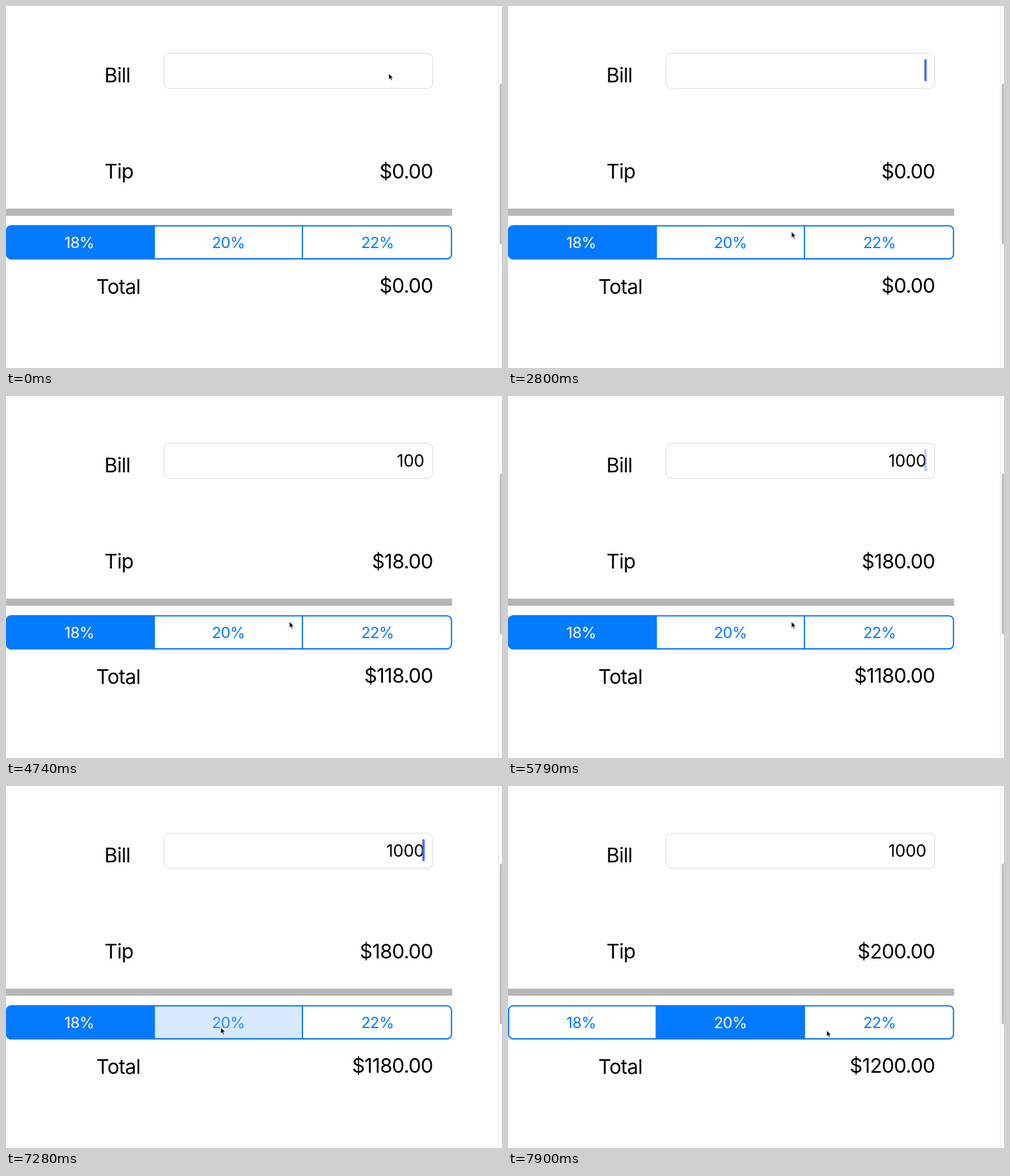
Animation, 875 px wide and 640 px high, one loop 8000 ms. Source, as an HTML page:

```html
<!DOCTYPE html>
<html lang="en">
<head>
<meta charset="utf-8">
<title>Tip calculator</title>
<style>
  html, body { margin: 0; width: 100%; height: 100%; overflow: hidden; background: #fefefe; }
  svg { display: block; width: 875px; height: 640px; }
  text { font-family: Inter, "Open Sans", sans-serif; fill: #000; }
  .label, .money { font-size: 35.4px; letter-spacing: -.75px; }
  .bill { font-size: 29.5px; letter-spacing: -.2px; }
  .money, .bill { text-anchor: end; }
  .rate { font-size: 27px; letter-spacing: -.6px; text-anchor: middle; }
</style>
</head>
<body>
<svg viewBox="0 0 875 640">
  <rect width="875" height="640" fill="#fefefe"/>
  <rect x="868" width="7" height="640" fill="#fafafa"/>
  <rect x="868" width="1" height="640" fill="#e8e8e8"/>
  <rect x="871" y="137" width="8" height="284.5" rx="3.5" fill="#c1c1c1"/>

  <text class="label" x="173.5" y="135">Bill</text>
  <text class="label" x="173.8" y="305.3">Tip</text>
  <text class="label" x="159.3" y="509">Total</text>

  <rect x="278.8" y="83.5" width="474" height="62.4" rx="10" fill="#fefefe" stroke="#d6d6d6"/>
  <text class="bill" id="bill" x="738" y="124.5"></text>
  <rect id="caret" x="734.4" y="94" width="4.2" height="39" rx="1.8" fill="#456ae8"/>

  <text class="money" id="tip" x="753.2" y="304.8"></text>
  <rect y="358.2" width="787" height="12.6" fill="#b6b6b6"/>
  <text class="money" id="total" x="753.2" y="507"></text>

  <clipPath id="round"><rect y="387.5" width="787" height="60.6" rx="9"/></clipPath>
  <g id="segments" clip-path="url(#round)"></g>
  <rect x="1.1" y="388.6" width="784.8" height="58.4" rx="8" fill="none" stroke="#047aff" stroke-width="2.3"/>
  <g id="rates"></g>

  <g id="pointer">
    <path d="M0 0V10.6L2.5 8.5L4.3 12.3L6.1 11.5L4.4 7.8H7.7Z" transform="translate(.6 1)" fill="#000" opacity=".18"/>
    <path d="M0 0V10.6L2.5 8.5L4.3 12.3L6.1 11.5L4.4 7.8H7.7Z" fill="#000" stroke="#fff" stroke-width=".8"/>
  </g>
</svg>
<script>
const LOOP = 8000;
const STEP = 150;           // the screen refreshes in steps of this many ms
const BLUE = "#047aff";
const PALE = "#fefefe";
const RATES = [18, 20, 22];
const SEGMENT = 261.4;

const TYPED = "1000";
const KEYS = [3400, 3700, 4000, 5190];
const PRESS = 7280;
const RELEASE = PRESS + STEP;
const WAKES = [...KEYS, 700, 5330, PRESS];   // the caret's blink restarts here

const HOME = { x: 675.2, y: 119.2 };
const MOVES = [
  { start: 140, steps: 1, x: 673.5, y: 119.2 },
  { start: 410, steps: 2, x: 665, y: 119.5 },
  { start: 1000, steps: 3, x: 500, y: 399 },
  { start: 5780, steps: 7, x: 379, y: 427, via: { x: 340, y: 560 } },
  { start: RELEASE, steps: 3, x: 562.2, y: 432 }
];

const el = id => document.getElementById(id);
const money = n => "$" + n.toFixed(2);
const ease = p => (1 - Math.cos(Math.PI * p)) / 2;
const curve = (a, b, c, p) => (1 - p) ** 2 * a + 2 * p * (1 - p) * b + p * p * c;

function add(parent, name, attrs) {
  const node = document.createElementNS("http://www.w3.org/2000/svg", name);
  for (const key in attrs) node.setAttribute(key, attrs[key]);
  return el(parent).appendChild(node);
}

const bar = (x, width, fill) =>
  add("segments", "rect", { x, y: 387.5, width, height: 60.6, fill });

const fills = RATES.map((r, i) => bar(i * SEGMENT, SEGMENT + 3, PALE));
[1, 2].forEach(i => bar(i * SEGMENT - 1, 2.3, BLUE));
const names = RATES.map((rate, i) => {
  const node = add("rates", "text", { class: "rate", x: 129.3 + 263 * i, y: 427.7 });
  node.textContent = rate + "%";
  return node;
});

function pointerAt(t) {
  let spot = HOME;
  for (const move of MOVES) {
    if (t < move.start) break;
    const done = Math.floor((t - move.start) / STEP) / move.steps;
    const p = ease(Math.min(1, done));
    const via = move.via || { x: (spot.x + move.x) / 2, y: (spot.y + move.y) / 2 };
    spot = { x: curve(spot.x, via.x, move.x, p), y: curve(spot.y, via.y, move.y, p) };
  }
  return spot;
}

// Three steps on, one fading, two off, one fading in.
function caretAt(t) {
  const wake = Math.max(...WAKES.filter(w => w <= t));
  if (wake < 0) return 0;
  const beat = Math.floor((t - wake) / STEP) % 7;
  return beat < 3 ? 1 : beat === 3 || beat === 6 ? .36 : 0;
}

function draw(t) {
  const { x, y } = pointerAt(t);
  el("pointer").setAttribute("transform", `translate(${x} ${y})`);
  el("caret").setAttribute("opacity", caretAt(t));

  const bill = TYPED.slice(0, KEYS.filter(k => k <= t).length);
  const chosen = t >= RELEASE ? 1 : 0;
  const pressed = t >= PRESS ? 1 : -1;
  const tip = bill * RATES[chosen] / 100;
  el("bill").textContent = bill;
  el("tip").textContent = money(tip);
  el("total").textContent = money(+bill + tip);

  fills.forEach((node, i) => {
    const on = i === chosen, held = i === pressed;
    node.setAttribute("fill", on ? BLUE : held ? "#d8e9fe" : PALE);
    names[i].style.fill = on ? "#fff" : held ? "#2b8dff" : BLUE;
  });
}

function tick() {
  draw(performance.now() % LOOP);
  requestAnimationFrame(tick);
}
tick();
</script>
</body>
</html>
```
